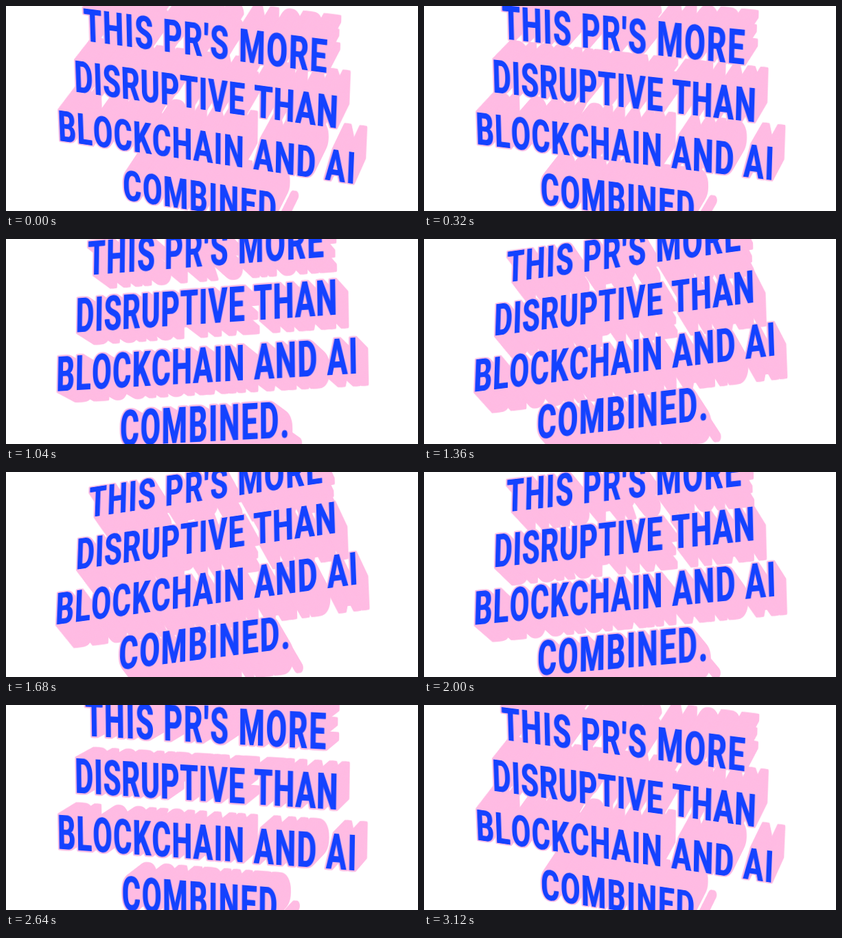
Write an HTML page without scripts that moves like this. It is 600 px wide and 300 px high and loops after 3.2 s.

```html
<!DOCTYPE html>
<html lang="en">
<head>
<meta charset="utf-8">
<title>Tilting block lettering</title>
<style>
  @property --turn {
    syntax: "<angle>";
    inherits: true;
    initial-value: 0deg;
  }
  html, body {
    margin: 0;
    width: 100%;
    height: 100%;
    overflow: hidden;
    background: #fff;
  }
  .stage {
    position: absolute;
    left: 0;
    top: 0;
    width: 600px;
    height: 300px;
    overflow: hidden;
    perspective: 2800px;
  }
  .block {
    position: absolute;
    inset: 0;
    transform-style: preserve-3d;
    transform: rotateX(calc(cos(var(--turn)) * -28.6deg)) rotateY(-16.3deg);
    animation: tilt 3.2s steps(40) infinite;
  }
  @keyframes tilt {
    from { --turn: 0deg; }
    to { --turn: 360deg; }
  }
  .block svg {
    position: absolute;
    left: 0;
    top: -50px;
    width: 600px;
    height: 400px;
    /* slices run from the back (0) to the face (23) */
    transform: translateZ(calc(var(--i) * 3.3px - 38px));
  }
  .defs { position: absolute; width: 0; height: 0; }
  text {
    font: 700 72px Roboto, "Liberation Sans", sans-serif;
    font-kerning: none;
    letter-spacing: 3.2px;
    text-anchor: middle;
  }
  .loose { letter-spacing: 3.9px; }
  .tight { letter-spacing: 2.6px; }
  #side {
    fill: #ffbbe3;
    stroke: #ffbbe3;
    stroke-width: 4.4px;
    stroke-linejoin: round;
  }
  #face { fill: #1442ff; }
</style>
</head>
<body>
<svg class="defs">
  <defs>
    <g id="words" transform="scale(.6 1)">
      <text y="-103.9" class="loose">THIS PR'S MORE</text>
      <text y="-17.6" class="tight">DISRUPTIVE THAN</text>
      <text y="68.7">BLOCKCHAIN AND AI</text>
      <text y="155" class="loose">COMBINED.</text>
    </g>
    <!-- doubled sideways to thicken the stems -->
    <g id="side"><use href="#words" x="-1.6"/><use href="#words" x="1.6"/></g>
    <g id="face"><use href="#words" x="-.6"/><use href="#words" x=".6"/></g>
  </defs>
</svg>
<div class="stage">
  <div class="block">
    <svg style="--i:0" viewBox="-300 -200 600 400"><use href="#side"/></svg>
    <svg style="--i:1" viewBox="-300 -200 600 400"><use href="#side"/></svg>
    <svg style="--i:2" viewBox="-300 -200 600 400"><use href="#side"/></svg>
    <svg style="--i:3" viewBox="-300 -200 600 400"><use href="#side"/></svg>
    <svg style="--i:4" viewBox="-300 -200 600 400"><use href="#side"/></svg>
    <svg style="--i:5" viewBox="-300 -200 600 400"><use href="#side"/></svg>
    <svg style="--i:6" viewBox="-300 -200 600 400"><use href="#side"/></svg>
    <svg style="--i:7" viewBox="-300 -200 600 400"><use href="#side"/></svg>
    <svg style="--i:8" viewBox="-300 -200 600 400"><use href="#side"/></svg>
    <svg style="--i:9" viewBox="-300 -200 600 400"><use href="#side"/></svg>
    <svg style="--i:10" viewBox="-300 -200 600 400"><use href="#side"/></svg>
    <svg style="--i:11" viewBox="-300 -200 600 400"><use href="#side"/></svg>
    <svg style="--i:12" viewBox="-300 -200 600 400"><use href="#side"/></svg>
    <svg style="--i:13" viewBox="-300 -200 600 400"><use href="#side"/></svg>
    <svg style="--i:14" viewBox="-300 -200 600 400"><use href="#side"/></svg>
    <svg style="--i:15" viewBox="-300 -200 600 400"><use href="#side"/></svg>
    <svg style="--i:16" viewBox="-300 -200 600 400"><use href="#side"/></svg>
    <svg style="--i:17" viewBox="-300 -200 600 400"><use href="#side"/></svg>
    <svg style="--i:18" viewBox="-300 -200 600 400"><use href="#side"/></svg>
    <svg style="--i:19" viewBox="-300 -200 600 400"><use href="#side"/></svg>
    <svg style="--i:20" viewBox="-300 -200 600 400"><use href="#side"/></svg>
    <svg style="--i:21" viewBox="-300 -200 600 400"><use href="#side"/></svg>
    <svg style="--i:22" viewBox="-300 -200 600 400"><use href="#side"/></svg>
    <svg style="--i:23" viewBox="-300 -200 600 400"><use href="#side"/></svg>
    <svg style="--i:23.2" viewBox="-300 -200 600 400"><use href="#face"/></svg>
  </div>
</div>
</body>
</html>
```
